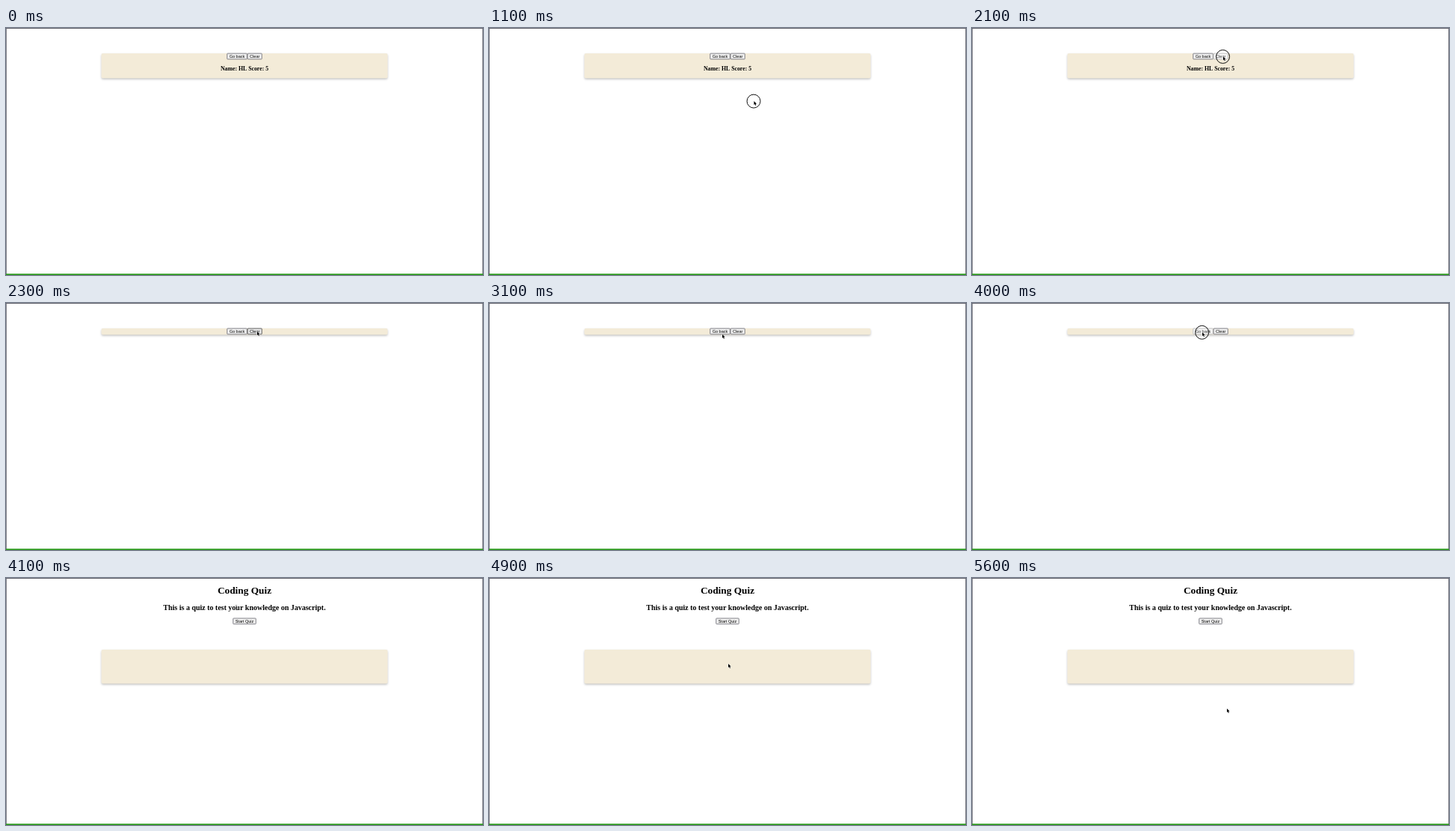
Animation of 640 by 331 pixels, one loop 5700 ms. Source, as an HTML page with a canvas:

```html
<!DOCTYPE html>
<html lang="en">
<head>
<meta charset="utf-8">
<title>Coding Quiz</title>
<style>
  html, body { margin: 0; width: 100%; height: 100%; overflow: hidden; background: #fff; }
  canvas { display: block; width: 640px; height: 331px; }
</style>
</head>
<body>
<canvas id="stage"></canvas>
<script>
const W = 640, H = 331, LOOP = 5700, STEP = 100;
const SERIF = '"Liberation Serif", "Times New Roman", serif';
const SANS = '"Liberation Sans", Arial, sans-serif';
const canvas = document.getElementById('stage');
const ctx = canvas.getContext('2d');
const dpr = window.devicePixelRatio || 1;
canvas.width = W * dpr;
canvas.height = H * dpr;

// Pointer path: time, x, y
const path = [
  [100, 330, 317], [300, 347, 163], [400, 347, 163], [900, 355.5, 98],
  [1400, 355.5, 98], [1900, 337, 38.3], [2600, 337, 38.3], [2900, 318, 39],
  [3100, 313, 42], [3200, 312, 50], [3400, 312, 77], [3800, 309, 39.3],
  [4400, 309, 39.3], [5000, 322, 121], [5300, 340, 262], [5600, 342, 175]
];
const clicks = [1100, 2100, 3900];
const CLEARED = 2300, HOME = 4100;

function pointerAt(t) {
  if (t < path[0][0]) return null;
  for (let i = 1; i < path.length; i++) {
    const [t0, x0, y0] = path[i - 1], [t1, x1, y1] = path[i];
    if (t <= t1) {
      const u = (t - t0) / (t1 - t0), k = u * u * (3 - 2 * u);
      return { x: x0 + (x1 - x0) * k, y: y0 + (y1 - y0) * k };
    }
  }
  const [, x, y] = path[path.length - 1];
  return { x, y };
}

function text(str, y, size) {
  ctx.font = `bold ${size}px ${SERIF}`;
  ctx.textAlign = 'center';
  ctx.fillStyle = '#000';
  ctx.fillText(str, 320, y);
}

function card(y, h) {
  ctx.save();
  ctx.shadowColor = 'rgba(0,0,0,.24)';
  ctx.shadowBlur = 3 * dpr;
  ctx.shadowOffsetY = 1.4 * dpr;
  ctx.fillStyle = '#f3ebd8';
  ctx.beginPath();
  ctx.roundRect(128, y, 384, h, 2);
  ctx.fill();
  ctx.restore();
}

function button(label, x, y, w, mouse, pressed) {
  const h = 8.5;
  const hover = mouse && mouse.x > x && mouse.x < x + w && mouse.y > y && mouse.y < y + h - 0.7;
  const active = hover && pressed;
  ctx.fillStyle = active ? '#f5f5f5' : hover ? '#e5e5e5' : '#efefef';
  ctx.strokeStyle = active ? '#bbb' : hover ? '#4f4f4f' : '#707078';
  ctx.lineWidth = 0.85;
  ctx.beginPath();
  ctx.roundRect(x + 0.4, y + 0.4, w - 0.8, h - 0.8, 0.8);
  ctx.fill();
  ctx.stroke();
  ctx.font = `5.56px ${SANS}`;
  ctx.textAlign = 'center';
  ctx.fillStyle = active ? '#333' : '#000';
  ctx.fillText(label, x + w / 2, y + 6.3);
}

function arrow({ x, y }) {
  ctx.beginPath();
  [[0, 0], [0, 5], [1.1, 4], [2, 6], [2.9, 5.6], [2.1, 3.7], [3.6, 3.6]]
    .forEach(([dx, dy]) => ctx.lineTo(x + dx, y + dy));
  ctx.closePath();
  ctx.lineJoin = 'round';
  ctx.lineWidth = 0.9;
  ctx.strokeStyle = '#fff';
  ctx.stroke();
  ctx.fillStyle = '#000';
  ctx.fill();
}

function beam({ x, y }) {
  ctx.fillStyle = '#555';
  ctx.fillRect(x - 0.3, y - 2.5, 0.6, 6);
  ctx.fillRect(x - 1.2, y - 2.8, 2.4, 0.5);
  ctx.fillRect(x - 1.2, y + 3.3, 2.4, 0.5);
}

function edges() {
  ctx.fillStyle = '#666670';
  ctx.fillRect(0, 0, W, 1);
  ctx.fillRect(0, 0, 0.8, H);
  ctx.fillRect(W - 0.8, 0, 0.8, H);
  ctx.fillStyle = '#2b9a1d';
  ctx.fillRect(0, 329.3, W, 1.7);
}

function draw(t) {
  const mouse = pointerAt(t);
  const pressed = clicks.some(c => t >= c && t < c + 200);
  const home = t >= HOME;
  ctx.setTransform(dpr, 0, 0, dpr, 0, 0);
  ctx.fillStyle = '#fff';
  ctx.fillRect(0, 0, W, H);

  if (home) {
    text('Coding Quiz', 21, 13.33);
    text('This is a quiz to test your knowledge on Javascript.', 42.9, 10);
    button('Start Quiz', 304.3, 53.6, 31.4, mouse, pressed);
    card(96, 45.6);
  } else {
    const cleared = t >= CLEARED;
    card(34, cleared ? 8.6 : 33.3);
    button('Go back', 296.3, 33.7, 27.4, mouse, pressed);
    button('Clear', 323.7, 33.7, 20, mouse, pressed);
    if (!cleared) text('Name: HL Score: 5', 57.4, 7.8);
  }
  edges();

  if (!mouse) return;
  if (home && mouse.y > 33 && mouse.y < 45) beam(mouse);
  else arrow(mouse);
  if (pressed) {
    ctx.strokeStyle = '#111';
    ctx.lineWidth = 1;
    ctx.beginPath();
    ctx.arc(mouse.x - 0.4, mouse.y + 0.1, 9, 0, Math.PI * 2);
    ctx.stroke();
  }
}

const start = performance.now();
function tick() {
  const t = (performance.now() - start) % LOOP;
  draw(Math.floor(t / STEP) * STEP);
  requestAnimationFrame(tick);
}
tick();
</script>
</body>
</html>
```
